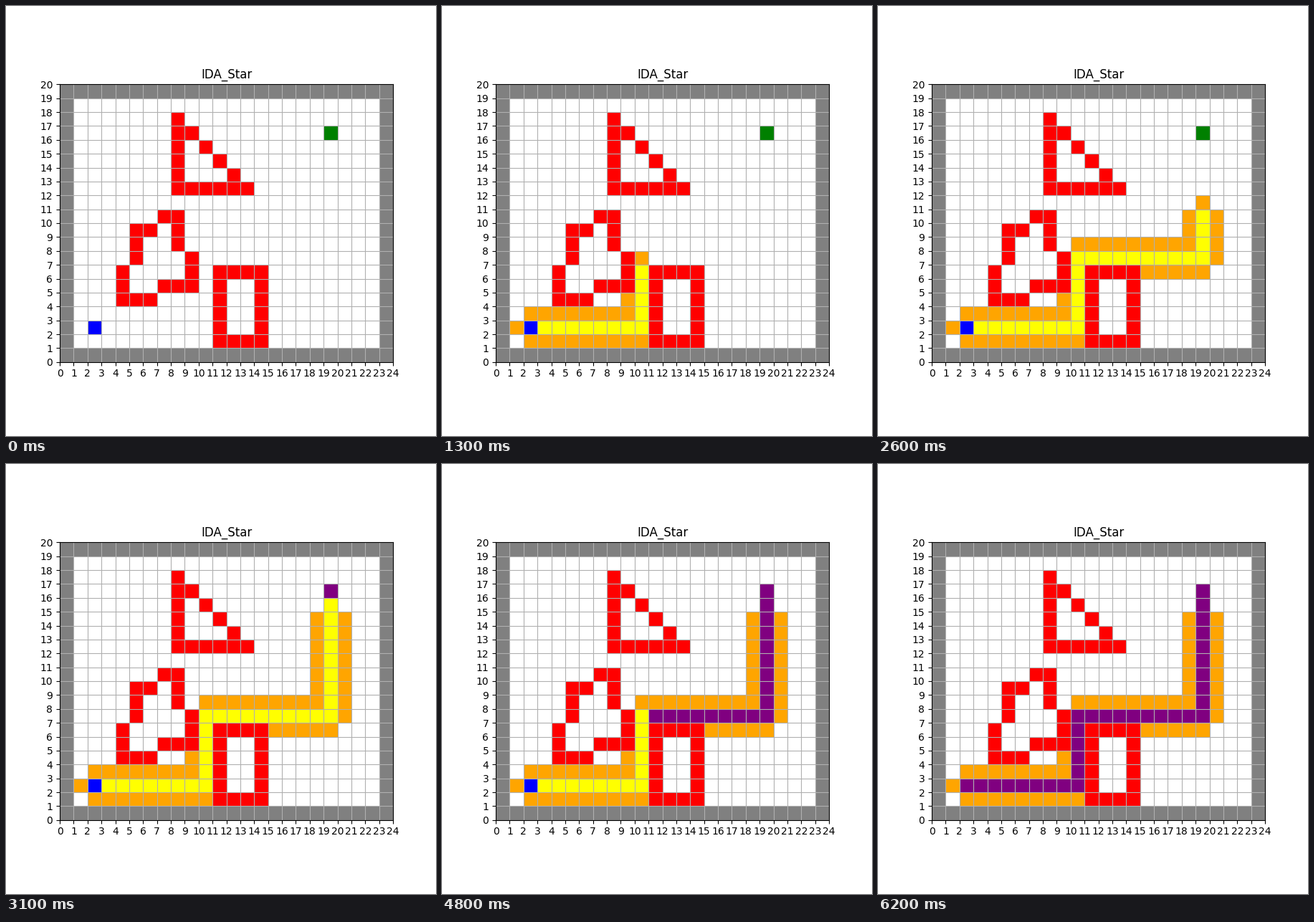
A matplotlib script for the animation above (6300 ms loop, 600 by 600 pixels).

```python
import numpy as np
import matplotlib.pyplot as plt
from matplotlib.animation import FuncAnimation
from matplotlib.colors import ListedColormap

COLS, ROWS = 24, 20
START, GOAL = (2, 2), (19, 16)
COLORS = ["white", "gray", "red", "blue", "green", "orange", "yellow", "purple"]
FREE, BORDER, BLOCK, BEGIN, END, SEEN, VISITED, ROUTE = range(len(COLORS))


def line(a, b):
    """Cells from a to b, both included, along a row, column or diagonal."""
    n = max(abs(b[0] - a[0]), abs(b[1] - a[1]))
    dx, dy = np.sign(b[0] - a[0]), np.sign(b[1] - a[1])
    return [(int(a[0] + i * dx), int(a[1] + i * dy)) for i in range(n + 1)]


def polyline(*points):
    cells = [points[0]]
    for a, b in zip(points, points[1:]):
        cells += line(a, b)[1:]
    return cells


def build_map():
    grid = np.full((ROWS, COLS), BORDER)
    grid[1:-1, 1:-1] = FREE
    triangle = polyline((8, 12), (8, 17), (13, 12), (8, 12))
    blob = (line((4, 4), (4, 6)) + line((5, 7), (5, 9)) + [(6, 9), (7, 10)]
            + line((8, 10), (8, 8)) + line((9, 7), (9, 5))
            + line((8, 5), (7, 5)) + line((6, 4), (5, 4)))
    box = polyline((11, 1), (11, 6), (14, 6), (14, 1), (11, 1))
    for x, y in triangle + blob + box:
        grid[y, x] = BLOCK
    grid[START[1], START[0]] = BEGIN
    grid[GOAL[1], GOAL[0]] = END
    return grid


BASE = build_map()
PATH = polyline(START, (10, 2), (10, 7), (19, 7), GOAL)
SEARCH = len(PATH) - 1
FRAMES = SEARCH + len(PATH)


def expand(grid, cell, look_around):
    x, y = cell
    if grid[y, x] != BEGIN:
        grid[y, x] = VISITED
    if look_around:
        for nx, ny in ((x + 1, y), (x - 1, y), (x, y + 1), (x, y - 1)):
            if grid[ny, nx] == FREE:
                grid[ny, nx] = SEEN


def state(step):
    grid = BASE.copy()
    for cell in PATH[:min(step, SEARCH)]:
        expand(grid, cell, cell != PATH[-2])
    # the route is traced back from the goal once it is reached
    for x, y in PATH[::-1][:max(0, step - SEARCH + 1)]:
        grid[y, x] = ROUTE
    return grid


fig, ax = plt.subplots(figsize=(6, 6), dpi=100)
mesh = ax.pcolormesh(np.arange(COLS + 1), np.arange(ROWS + 1), BASE,
                     cmap=ListedColormap(COLORS), vmin=-0.5,
                     vmax=len(COLORS) - 0.5)
ax.set_aspect("equal")
ax.set_xlim(0, COLS)
ax.set_ylim(0, ROWS)
ax.set_xticks(range(COLS + 1))
ax.set_yticks(range(ROWS + 1))
ax.grid(True)
ax.set_title("IDA_Star")


def update(step):
    mesh.set_array(state(step))
    return [mesh]


anim = FuncAnimation(fig, update, frames=FRAMES, interval=100,
                     repeat=True, repeat_delay=0)
plt.show()
```
